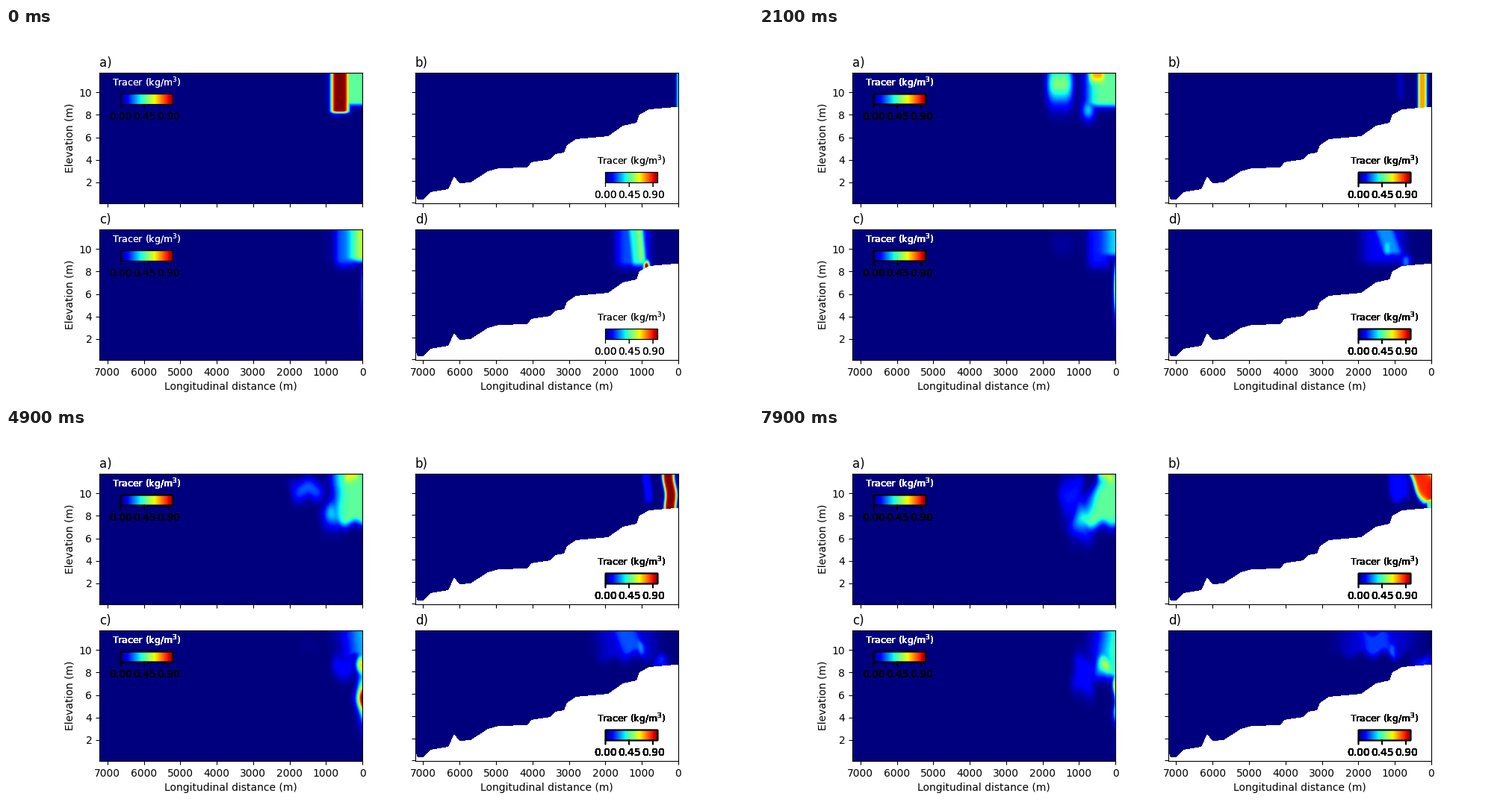
Animation of 1000 by 500 pixels, one loop 8 s. Source, as a matplotlib script:

```python
import numpy as np
import matplotlib.pyplot as plt
from matplotlib.animation import FuncAnimation
from matplotlib.patches import Rectangle

FRAMES, STEP = 80, 100
END = (FRAMES - 1) * STEP / 1000
COPIES = 16
TOP, W, H = 60, 352, 175
VMAX = 0.99

# River bed corners in stage pixels.
BED = np.array([
    (547, 218), (551, 230), (558, 230), (568, 220), (592, 216), (600, 199),
    (607, 208), (622, 207), (645, 192), (660, 188), (698, 187), (703, 180),
    (728, 176), (734, 169), (746, 167), (750, 157), (762, 149), (805, 145),
    (825, 131), (843, 127), (847, 116), (860, 109), (900, 105.5)])


def grow(t, start, span):
    k = np.clip((t - start) / span, 0, 1)
    return k * k * (3 - 2 * k)


def pulse(t, peak, span):
    return np.exp(-((t - peak) / span) ** 2)


def mix(a, b, k):
    return a + (b - a) * k


class Cloud:
    """Smooth maximum of soft plumes, in upper-row stage pixels."""

    def __init__(self, x, y, t):
        stir = grow(t, 2, 4)
        self.x = x + 1.5 * stir * np.sin(y / 7 + t)
        self.y = y + 4 * stir * np.sin(x / 5 + t / 2)
        self.total = 0

    def add(self, amp, cx, w, top, bottom, fade, lean=0, p=4):
        dx = np.abs(self.x - cx - lean * (self.y - TOP)) / w
        dy = np.maximum(np.maximum(top - self.y, self.y - bottom), 0) / fade
        self.total = self.total + (amp * np.exp(-dx ** p - dy ** 2)) ** 4

    def value(self):
        return self.total ** 0.25


def plume_a(c, t):
    u = t / END
    # released core
    c.add(0.55 + 0.5 * np.exp(-t / 1.7), 446 + 17 * grow(t, 1.4, 1.8), 12,
          0, 62 + 48 * np.exp(-2.5 * t), 4 + 12 * grow(t, 0, 1.3))
    # wide body, later leaning upstream
    c.add(0.46, 467 + 21 * grow(t, 4.5, 3.4), 30,
          0, 98 + 20 * grow(t, 2, 2), 6 + 8 * u, -0.55 * grow(t, 5, 2.9))
    # sinking tip
    depth = 105 + 18 * u
    c.add(0.32, 443 - 12 * u, 7 + 6 * u, depth, depth, 10 + 13 * u, p=2)
    # detached cloud
    thin = pulse(t, 4.5, 1.9)
    mid = 72 + 10 * thin + 16 * grow(t, 6, 2)
    amp = grow(t, 0.1, 1.2) * (0.13 + 0.37 * np.exp(-max(t - 2.3, 0) / 1.7))
    c.add(amp, 430 - 28 * grow(t, 0, 1.5) + 16 * grow(t, 5.5, 2.4),
          16 + 5 * thin, mid, mid, 30 - 17 * thin)


def plume_b(c, t):
    spread = grow(t, 4.2, END - 4.2)
    rise = grow(t, 1, 2)
    c.add(0.34 + 0.68 * rise - 0.16 * spread,
          900 - 13 * grow(t, 0, 1.2) - 5 * spread,
          4 + 3.5 * rise + 8 * spread,
          0, 150 - 54 * spread, 6, 0.6 * spread)
    c.add(0.46 * spread, 897, 5, 0, 150, 6)
    c.add(0.13 * grow(t, 0.8, 3), 858 - 7 * spread, 5 + 8 * spread,
          0, 88, 8, 0.25 * spread)


def plume_c(c, t):
    u = t / END
    late = grow(t, 4, 4)
    c.add(0.3 + 0.3 * np.exp(-t / 1.2) + 0.12 * grow(t, 6, 2), 480, 26,
          0, 88 + 8 * np.exp(-t) + 24 * grow(t, 4.5, 3), 8, p=2)
    c.add(0.12 + 0.09 * np.exp(-t / 1.5), 454 - 20 * late, 15,
          mix(40, 110, grow(t, 1.5, 4)), mix(100, 130, grow(t, 3, 5)),
          10 + 8 * u)
    c.add(0.04 * pulse(t, 3, 1.6), 405, 15, 80, 80, 14)
    # jet along the wall and its tail
    wide = pulse(t, 5.2, 2.2)
    mid = 138 + 12 * pulse(t, 4.8, 1.8)
    c.add(0.4 + 0.62 * grow(t, 0, 3.5) - 0.28 * grow(t, 6, 2), 478,
          3 + 5 * wide, mid, mid, 36 - 10 * wide, p=2)
    c.add(0.13, 478, 4, 140, 180, 30, p=2)
    # spot drifting off the wall
    mid = 88 + 21 * grow(t, 2.5, 3)
    c.add(0.68 * grow(t, 2, 2) - 0.13 * grow(t, 6, 2), 478 - 17 * late,
          6 + 6 * late, mid, mid, 15, p=2)


def plume_d(c, t):
    u = t / END
    start = grow(t, 0, 1.5)
    c.add(0.08 + 0.12 * np.exp(-t / 1.3), 838 - 12 * u, 22 + 28 * u,
          0, 102 - 16 * u, 9)
    c.add(0.17 + 0.22 * np.exp(-t / 2.5), 842 - 22 * u, 11 + 12 * u,
          mix(40, 68, u), 102 - 18 * grow(t, 0, 3), 8, 0.1 + 0.25 * start)
    # streak, then a small patch
    c.add(0.2 + 0.27 * np.exp(-t / 2.5), 848 - 8 * pulse(t, 2, 1.5), 6,
          mix(40, 82, start), 98 - 10 * start, 8, 0.08 * (1 - start), p=2)
    # spot sliding up the bed
    mid = 109 - 8 * start
    c.add(0.15 + 0.9 * np.exp(-t / 0.9), 856.5 + 32 * u, 4 + 8 * u,
          mid, mid + 4, 7, p=2)


fig, axes = plt.subplots(2, 2, figsize=(10, 5), dpi=100)
y = TOP + np.arange(H)[:, None] + 0.5
panels = []
for ax, name, plume in zip(axes.flat, "abcd",
                           (plume_a, plume_b, plume_c, plume_d)):
    right, lower = name in "bd", name in "cd"
    x = (548 if right else 125) + np.arange(W)[None, :] + 0.5
    dry = y > np.interp(x, *BED.T) if right else np.zeros((H, W), bool)
    img = ax.imshow(np.zeros((H, W)), cmap="jet", vmin=0, vmax=VMAX,
                    extent=(7220, 0, -0.05 if right else 0.148, 11.72),
                    aspect="auto", interpolation="nearest")
    ax.set_xticks(range(0, 8000, 1000))
    ax.set_yticks(range(0 if right else 2, 12, 2))
    ax.set_title(name + ")", loc="left")
    ax.tick_params(labelbottom=lower, labelleft=not right)
    if lower:
        ax.set_xlabel("Longitudinal distance (m)")
    if not right:
        ax.set_ylabel("Elevation (m)")
    panels.append((img, plume, x, dry))

# Colour keys live on a full-stage layer in pixel units.
layer = fig.add_axes([0, 0, 1, 1])
layer.axis("off")
prints = [[] for _ in range(COPIES)]


def key(x0, y0, color):
    x0, y0 = x0 + 0.5, y0 + 0.5
    layer.imshow(np.linspace(0, 1, 256)[None, :], cmap="jet", aspect="auto",
                 extent=(x0, x0 + 70, y0 + 14, y0))
    for group in prints:
        group.append(layer.add_patch(Rectangle(
            (x0, y0), 70, 14, fill=False, lw=0.8, ec="k", snap=False)))
        group.append(layer.text(x0 + 35, y0 - 10.5, "Tracer (kg/m$^3$)",
                                size=9, color=color, ha="center"))
        for v in (0, 0.45, 0.9):
            tx = x0 + 70 * v / VMAX
            group += layer.plot([tx, tx], [y0 + 14, y0 + 19], "k", lw=0.8,
                                snap=False)
            group.append(layer.text(tx, y0 + 23.7, f"{v:.2f}", size=10,
                                    ha="center", va="top"))


for dy in (0, 210):
    key(153, 88 + dy, "w")
    key(802, 193 + dy, "k")
layer.set_xlim(0, 1000)
layer.set_ylim(500, 0)


def draw(n):
    t = n * STEP / 1000
    for img, plume, x, dry in panels:
        cloud = Cloud(x, y, t)
        plume(cloud, t)
        img.set_data(np.where(dry, np.nan, cloud.value()))
    # The keys are overprinted each step, so their edges grow heavier.
    for i, group in enumerate(prints):
        for artist in group:
            artist.set_visible(i < n + 2)
    return []


anim = FuncAnimation(fig, draw, frames=FRAMES, interval=STEP, repeat=True,
                     init_func=lambda: draw(0))
plt.show()
```
